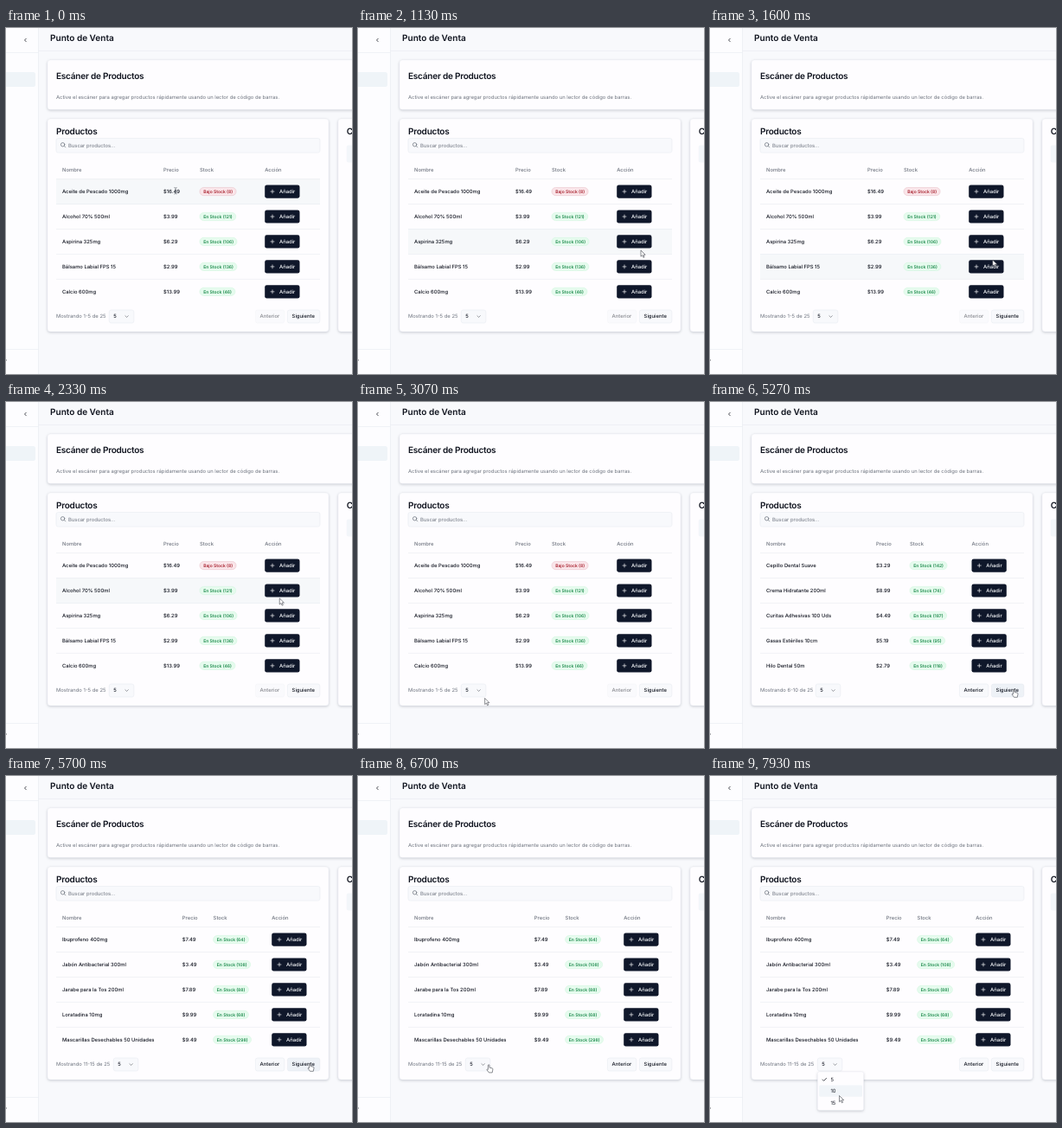
These frames come from a looping animation (400x400 px, 8000 ms). An HTML page:

```html
<!DOCTYPE html>
<html lang="es">
<head>
<meta charset="utf-8">
<title>Punto de Venta</title>
<style>
  html, body { margin: 0; width: 100%; height: 100%; overflow: hidden; background: #f8f9fc; }
  svg { display: block; width: 100vw; height: 100vh; }
  text { font-family: Inter, sans-serif; font-size: 5.87px; fill: #10141f; text-rendering: geometricPrecision; white-space: pre; }
  .title { font-size: 10.06px; font-weight: 600; }
  .tight { letter-spacing: -.025em; }
  .muted { fill: #6d737e; }
  .medium { font-weight: 500; }
  .badge text { font-size: 5.03px; font-weight: 600; }
  .line { stroke: #e2e6ec; stroke-width: .5; fill: none; }
  .card { fill: #fefdff; stroke: #e8ebf1; stroke-width: .4; filter: drop-shadow(0 1.5px 1.5px rgba(15, 23, 42, .2)); }
  .control { fill: #f8f9fc; stroke: #e2e7ed; stroke-width: .45; }
  .icon { fill: none; stroke: #10141f; stroke-width: .75; stroke-linecap: round; stroke-linejoin: round; }
  .cursor { fill: #fff; stroke: #3d4149; stroke-width: .6; stroke-linejoin: round; }
  .beam { fill: none; stroke: #555a63; stroke-width: .55; stroke-linecap: round; }
</style>
</head>
<body>
<svg id="stage" viewBox="0 0 400 400"></svg>
<script>
const LOOP = 8000;
const ROW_TOP = 174.6, ROW_H = 28.95;
const PAGE_2_AT = 4530, PAGE_3_AT = 5680, OPEN_AT = 7070;
const LOADING = [[4400, PAGE_2_AT], [5600, PAGE_3_AT]];

const pages = [
  { range: '1-5', price: 182, stock: 224, action: 299.2, select: 119.3, items: [
    ['Aceite de Pescado 1000mg', '16.49', 8], ['Alcohol 70% 500ml', '3.99', 121],
    ['Aspirina 325mg', '6.29', 106], ['Bálsamo Labial FPS 15', '2.99', 136], ['Calcio 600mg', '13.99', 46]] },
  { range: '6-10', price: 192, stock: 231, action: 302.5, select: 122.2, items: [
    ['Cepillo Dental Suave', '3.29', 142], ['Crema Hidratante 200ml', '8.99', 74],
    ['Curitas Adhesivas 100 Uds', '4.49', 187], ['Gasas Estériles 10cm', '5.19', 95], ['Hilo Dental 50m', '2.79', 118]] },
  { range: '11-15', price: 203.8, stock: 239.6, action: 307.2, select: 124.3, items: [
    ['Ibuprofeno 400mg', '7.49', 64], ['Jabón Antibacterial 300ml', '3.49', 108],
    ['Jarabe para la Tos 200ml', '7.89', 88], ['Loratadina 10mg', '9.99', 68],
    ['Mascarillas Desechables 50 Unidades', '9.49', 298]] },
];

// Pointer stops: time, x, y
const stops = [
  [0, 196, 188], [600, 196, 188], [1130, 327, 257], [1415, 328, 275], [2215, 319, 225], [2270, 319, 225],
  [3085, 146.5, 342.5], [3870, 358, 323], [3990, 358, 323], [4130, 351.3, 332.3], [6120, 351.3, 332.3],
  [6800, 139, 334], [7690, 139, 334], [7930, 149.5, 369.5], [LOOP, 149.5, 369.5],
];

const text = (x, y, s, cls = '', extra = '') => `<text x="${x}" y="${y}" class="${cls}" ${extra}>${s}</text>`;
const rect = (x, y, w, h, r, cls, extra = '') =>
  `<rect x="${x}" y="${y}" width="${w}" height="${h}" rx="${r}" class="${cls}" ${extra}/>`;
const path = (d, cls, extra = '') => `<path d="${d}" class="${cls}" ${extra}/>`;

function badge(x, y, stock) {
  const low = stock < 10;
  const [fill, edge, ink] = low ? ['#fae6ea', '#e3b3bb', '#a8202e'] : ['#e6fbee', '#c9f3d8', '#1b8a4b'];
  return `<g class="badge">${rect(x, y - 4.6, 40, 9.2, 4.6, '', `fill="${fill}" stroke="${edge}" stroke-width=".45"`)}
    ${text(x + 4.2, y + 1.8, `${low ? 'Bajo' : 'En'} Stock (${stock})`, '', `style="fill:${ink}"`)}</g>`;
}

function tablePage(p) {
  const rows = p.items.map(([name, price, stock], i) => {
    const y = ROW_TOP + ROW_H * i + 14.45;
    return text(65, y + 2.1, name, 'medium') + text(p.price, y + 2.1, '$' + price, 'medium') + badge(p.stock, y, stock)
      + rect(p.action, y - 7.6, 40.3, 15.2, 2.3, 'add', 'fill="#0f172a"')
      + path(`M${p.action + 6.8} ${y}h4M${p.action + 8.8} ${y - 2}v4`, 'icon', 'style="stroke:#fff;stroke-width:.65"')
      + text(p.action + 16.8, y + 2.1, 'Añadir', 'medium', 'style="fill:#f8fafc"');
  }).join('');
  return `<g class="page">
    ${text(p.price, 166.4, 'Precio', 'muted medium')}${text(p.stock, 166.4, 'Stock', 'muted medium')}
    ${text(p.action, 166.4, 'Acción', 'muted medium')}${rows}
    ${text(58, 335.4, `Mostrando ${p.range} de 25`, 'muted')}
    <g class="select">${rect(p.select, 326, 28.6, 15, 2.3, 'control')}
      ${text(p.select + 5, 335.4, '5', 'medium')}
      ${path(`M${p.select + 18.6} 332.7l1.7 1.7 1.7-1.7`, 'icon', 'opacity=".55"')}</g></g>`;
}

const pageButton = (id, x, w, label) => `<g id="${id}">${rect(x, 326, w, 15, 2.3, 'control')}
  ${text(x + 5.2, 335.4, label, 'medium')}</g>`;

const stage = document.getElementById('stage');
stage.innerHTML = `
  <rect width="400" height="400" fill="#f8f9fc"/>
  <rect width="37.5" height="400" fill="#fdfdff"/>
  ${path('M37.5 0V400M0 28.5H37.5M37.5 26.5H400M0 371.5H37.5', 'line')}
  ${rect(-5, 51, 39, 17, 2.5, '', 'fill="#eff4f8"')}
  ${path('M23.3 12.2l-1.8 1.8 1.8 1.8M-1 382.5l1.4 1.5-1.4 1.5', 'icon')}
  ${text(51, 15.2, 'Punto de Venta', 'title')}
  ${rect(48, 37, 370, 57.3, 3.3, 'card')}
  ${text(58, 59, 'Escáner de Productos', 'title tight')}
  ${text(58, 81.6, 'Active el escáner para agregar productos rápidamente usando un lector de código de barras.', 'muted')}
  ${rect(48, 105, 325, 246, 3.3, 'card')}
  ${rect(384, 105, 40, 246, 3.3, 'card')}
  ${text(393.7, 123.1, 'C', 'title tight')}
  ${rect(393.7, 135.5, 20, 20, 2.3, '', 'fill="#f3f6fa"')}
  ${text(58, 123.1, 'Productos', 'title tight')}
  ${rect(58, 127.5, 305, 16.6, 2.3, 'control')}
  <circle cx="65.6" cy="134.8" r="2.2" class="icon" style="stroke:#6d737e"/>
  ${path('M67.3 136.5l1.4 1.4', 'icon', 'style="stroke:#6d737e"')}
  ${text(72, 138.1, 'Buscar productos...', 'muted')}
  ${text(65, 166.4, 'Nombre', 'muted medium')}
  ${[0, 1, 2, 3, 4].map(i => rect(58, ROW_TOP + ROW_H * i, 305, ROW_H, 0, 'row', 'fill="#f6f8fa"')
    + path(`M58 ${ROW_TOP + ROW_H * i}H363`, 'line')).join('')}
  ${pageButton('prev', 288.4, 33.4, 'Anterior')}${pageButton('next', 325.4, 37.4, 'Siguiente')}
  ${pages.map(tablePage).join('')}
  <g id="menu">${rect(124.3, 342, 53.4, 44.6, 2.3, 'card')}
    ${rect(126.2, 344.4, 49.8, 13.2, 1.3, '', 'id="choice" fill="#f1f5f9"')}
    ${path('M130.2 351l1.4 1.4 2.9-3', 'icon')}
    ${[5, 10, 15].map((n, i) => text(139.4, 353.1 + 13.2 * i, n)).join('')}</g>
  <g id="pointer">
    ${path('M0 0V7.2L1.7 5.7 2.9 8.3 4.1 7.8 2.9 5.2H5.2Z', 'cursor', 'data-kind="arrow"')}
    ${path('M-1.3 -3.6Q0 -3.6 0 -2.7V3.1Q0 4 -1.3 4M1.3 -3.6Q0 -3.6 0 -2.7M0 3.1Q0 4 1.3 4M-.8 .8H.8', 'beam', 'data-kind="beam"')}
    ${path('M-.8 .3Q0 -.5 .8 .3V3.2L3.9 3.9Q4.8 4.2 4.7 5.2L4 9H.2L-2.2 5.8Q-2.2 4.6 -.8 5.4Z', 'cursor', 'data-kind="hand"')}
  </g>`;

const all = sel => [...stage.querySelectorAll(sel)];
const show = (el, on) => { el.style.display = on ? '' : 'none'; };
const [prev, next, menu, choice, pointer] =
  ['prev', 'next', 'menu', 'choice', 'pointer'].map(id => document.getElementById(id));
const pageGroups = all('.page'), rowRects = all('.row'), selects = all('.select');
const addButtons = pageGroups.map(g => [...g.querySelectorAll('.add')]);

for (const b of all('.badge')) {
  b.querySelector('rect').setAttribute('width', b.querySelector('text').getComputedTextLength() + 8.2);
}

function pointerAt(t) {
  t = Math.max(0, t);
  const i = Math.max(1, stops.findIndex(s => s[0] >= t));
  const [t0, x0, y0] = stops[i - 1], [t1, x1, y1] = stops[i];
  const p = (t - t0) / (t1 - t0), e = p * p * (3 - 2 * p);
  return [x0 + (x1 - x0) * e, y0 + (y1 - y0) * e];
}

const inside = ([px, py], x, y, w, h) => px >= x && px < x + w && py >= y && py < y + h;

// Share of the last 150 ms spent over a box, which gives the soft hover change
function hover(t, ...box) {
  let n = 0;
  for (let k = 0; k < 6; k++) n += inside(pointerAt(t - k * 25), ...box);
  return n / 6;
}

const mix = (a, b, p) => `rgb(${a.map((v, i) => Math.round(v + (b[i] - v) * p))})`;

function render(t) {
  const page = t < PAGE_2_AT ? 0 : t < PAGE_3_AT ? 1 : 2;
  const loading = LOADING.some(([a, b]) => t >= a && t < b);
  const pos = pointerAt(t);
  const p = pages[page];

  pageGroups.forEach((g, i) => show(g, i === page));
  rowRects.forEach((r, i) => {
    const y = ROW_TOP + ROW_H * i;
    r.style.opacity = hover(t, 58, y, 305, ROW_H);
    addButtons[page][i].style.fill = inside(pos, p.action, y + 6.85, 40.3, 15.2) ? '#272e3f' : '#0f172a';
  });
  prev.style.opacity = loading || page === 0 ? .5 : 1;
  next.style.opacity = loading ? .5 : 1;
  selects[page].style.opacity = loading ? .5 : 1;
  [[prev, 288.4, 33.4, page > 0], [next, 325.4, 37.4, true]].forEach(([b, x, w, enabled]) => {
    b.firstChild.style.fill = mix([248, 249, 252], [238, 242, 247], enabled ? hover(t, x, 326, w, 15) : 0);
  });

  show(menu, t >= OPEN_AT);
  choice.setAttribute('y', pos[1] > 357.6 ? 357.6 : 344.4);

  const overRow = Math.floor((pos[1] - ROW_TOP) / ROW_H);
  const rowOffset = pos[1] - ROW_TOP - ROW_H * overRow;
  const inTable = overRow >= 0 && overRow < 5;
  const overAdd = inTable && inside([pos[0], rowOffset], p.action, 6.85, 40.3, 15.2);
  const overNext = !loading && inside(pos, 325.4, 326, 37.4, 15);
  const overPrev = page > 0 && inside(pos, 288.4, 326, 33.4, 15);
  const overSelect = t < 7400 && inside(pos, p.select, 326, 28.6, 15);
  const overPrice = inTable && inside([pos[0], rowOffset], p.price, 10, 20, 9);
  const kind = overAdd || overNext || overPrev || overSelect ? 'hand' : overPrice ? 'beam' : 'arrow';
  for (const c of pointer.children) show(c, c.dataset.kind === kind);
  pointer.setAttribute('transform', `translate(${pos})`);
}

function tick() {
  render(performance.now() % LOOP);
  requestAnimationFrame(tick);
}
tick();
</script>
</body>
</html>
```
